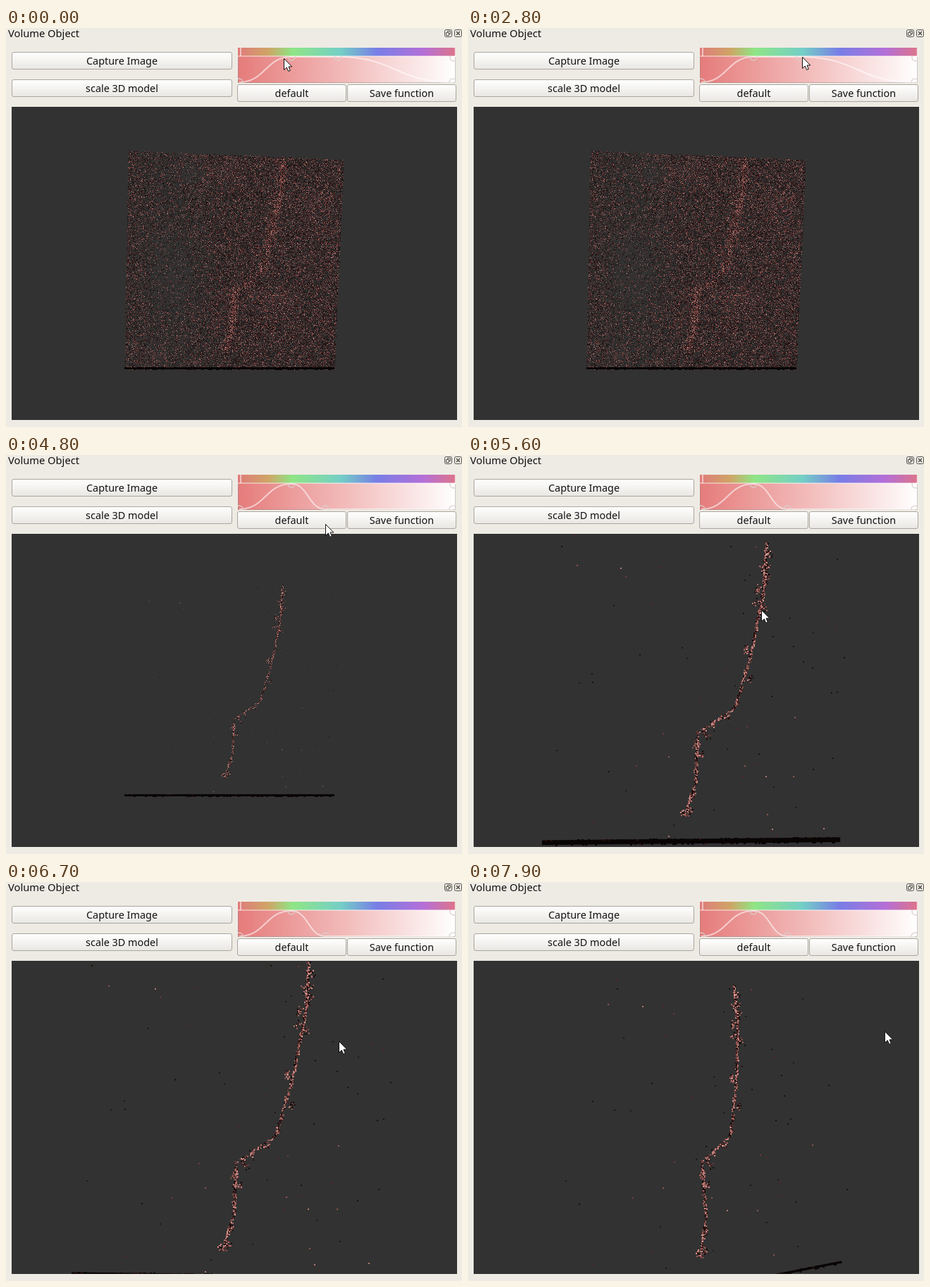
Write an HTML page with a canvas that moves like this. It is 647x567 px and loops after 8 s.

```html
<!DOCTYPE html>
<html lang="en">
<head>
<meta charset="utf-8">
<title>Volume Object</title>
<style>
  html, body { margin: 0; width: 100%; height: 100%; overflow: hidden; background: #eeebe4; }
  canvas { position: absolute; left: 8px; top: 112px; background: #323232; }
  svg { position: absolute; left: 0; top: 0; }
  text { font: 14.4px "Noto Sans", "Open Sans", sans-serif; fill: #111; }
  .title { font-size: 14.7px; }
  .btn rect { fill: url(#face); stroke: #aaa69f; }
  .btn text { text-anchor: middle; }
  .dock { fill: none; stroke: #55524d; }
  #knots { fill: none; stroke: #d9d0d0; stroke-opacity: .85; stroke-width: 1.5; }
</style>
</head>
<body>
<canvas id="view" width="632" height="445"></canvas>
<svg width="647" height="567">
  <defs>
    <linearGradient id="face" x2="0" y2="1">
      <stop stop-color="#fff"/><stop offset="1" stop-color="#e9e7e2"/>
    </linearGradient>
    <linearGradient id="hue">
      <stop stop-color="#e07b7b"/><stop offset=".14" stop-color="#cfa566"/>
      <stop offset=".25" stop-color="#8fe585"/><stop offset=".47" stop-color="#74cfc6"/>
      <stop offset=".64" stop-color="#787ee6"/><stop offset=".85" stop-color="#b46fd8"/>
      <stop offset="1" stop-color="#dd7489"/>
    </linearGradient>
    <linearGradient id="fade">
      <stop stop-color="#e57c7b"/><stop offset=".5" stop-color="#f2bcbb"/><stop offset="1" stop-color="#fff"/>
    </linearGradient>
    <clipPath id="box"><path d="M329 40H638V78H329z"/></clipPath>
  </defs>
  <text class="title" x="3" y="13">Volume Object</text>
  <g class="dock">
    <rect x="622.5" y="2.5" width="10" height="10" rx="2"/>
    <path d="M626.5 6.5V4.5h4v4h-2M624.5 6.5h4v4h-4z"/>
    <rect x="636.5" y="2.5" width="10" height="10" rx="2"/>
    <path d="M639 5l5 5m0-5l-5 5" stroke-width="1.6"/>
  </g>
  <g id="buttons"></g>
  <rect x="329" y="28" width="309" height="12" fill="url(#hue)"/>
  <path d="M333 28v12M637.5 28v12" stroke="#fff" stroke-opacity=".7" stroke-width="1.5"/>
  <rect x="329" y="40" width="309" height="38" fill="url(#fade)"/>
  <path d="M329 40H638" stroke="#fff" stroke-opacity=".8"/>
  <path d="M329.5 41V77.5H637.5V41" fill="none" stroke="#8d8583" stroke-opacity=".45"/>
  <g clip-path="url(#box)">
    <path id="curve" fill="none" stroke="#fff" stroke-opacity=".58" stroke-width="2"/>
    <g id="knots">
      <circle cx="331" cy="77" r="5"/><circle cx="405" cy="41" r="5"/><circle id="knot" r="5"/>
      <circle cx="635" cy="42" r="5"/><circle cx="634" cy="77" r="5"/>
    </g>
  </g>
  <path id="cursor" d="M.5 .5V16.5L4.3 13L6.7 18.5L9.3 17.4L7 12H11.8z" fill="#fff" stroke="#111"/>
</svg>
<script>
const $ = id => document.getElementById(id);
const ctx = $('view').getContext('2d');
ctx.translate(-8, -112);

$('buttons').innerHTML = [
  ['Capture Image', 8, 34, 313], ['scale 3D model', 8, 73, 313],
  ['default', 328, 80, 155], ['Save function', 484, 80, 155]
].map(([label, x, y, w]) => `<g class="btn">
  <rect x="${x + .5}" y="${y + .5}" width="${w - 1}" height="24" rx="2.5"/>
  <text x="${x + w / 2}" y="${y + 18}">${label}</text></g>`).join('');

const ramp = (t, from, to) => Math.min(1, Math.max(0, (t - from) / (to - from)));
const mix = (a, b, f) => a + (b - a) * f;

let seed = 4711;
const rnd = () => (seed = seed * 16807 % 2147483647) / 2147483647;
const spread = r => (rnd() + rnd() + rnd() - 1.5) * r;
const pick = list => list[Math.floor(rnd() * list.length)];

const stemInk = ['#bd7771', '#a3625b', '#85504a', '#67393a', '#cf918a', '#261212', '#140a0a', '#3c1f1e'];
const reds = ['#54292a', '#6f3a37', '#91554f', '#b47870'];
const darks = ['#180f0f', '#241717', '#1e1313'];

// The dendrite leans away from the viewer towards its top
const stem = [[392, 184], [389, 232], [376, 298], [360, 350], [323, 375], [321, 425], [310, 458]];
const depthAt = y => (y - 360) * .2;
function onStem() {
  const y = mix(184, 458, rnd());
  const i = stem.findIndex(p => p[1] >= y), a = stem[i - 1], b = stem[i];
  return [mix(a[0], b[0], (y - a[1]) / (b[1] - a[1])), y];
}

const dots = [];
const add = (x, y, z, ink, rank = 0) => dots.push({ x, y, z, ink, rank });

for (let i = 0; i < 750; i++) {
  const [x, y] = onStem();
  add(x + spread(1.5), y + spread(1.5), depthAt(y), pick(stemInk));
}
for (let spine = 0; spine < 26; spine++) {
  const [x, y] = onStem(), dx = spread(8);
  for (let i = 0; i < 12; i++) add(x + dx + spread(3.5), y + spread(3.5), depthAt(y), pick(stemInk));
}

// Noise filling the block: thinner at the left, redder in a few patches
const patches = [[217, 466, 13], [380, 385, 20], [315, 205, 14], [440, 250, 20]];
const blob = (x, y, [cx, cy, r]) => Math.exp(-((x - cx) ** 2 + (y - cy) ** 2) / (r * r));
for (let i = 0; i < 78000; i++) {
  const u = rnd(), v = rnd();
  const x = 173 + 306 * u - v * (5 + 8 * u), y = 174 + 13 * u + v * (311 - 13 * u);
  const ring = Math.hypot(x - 265, y - 206);
  const fill = .5 + .4 * ramp(x, 250, 320) + .2 * ramp(x, 215, 185)
    - .3 * blob(x, y, [235, 350, 50]) - (ring < 15 ? .35 : 0);
  if (rnd() > fill) continue;
  const glow = patches.reduce((sum, p) => sum + .6 * blob(x, y, p), ring > 17 && ring < 29 ? .35 : 0);
  const ink = rnd() < .44 + .4 * glow ? reds[Math.floor(rnd() ** 1.7 * 4)] : pick(darks);
  add(x, y, spread(70), ink, rnd());
}
for (let i = 0; i < 1000; i++) {
  const [x, y] = onStem();
  add(x + spread(8), y + spread(6), depthAt(y), pick(reds), mix(.01, 1, rnd()));
}
const bumps = Array.from({ length: 110 }, () => [rnd(), rnd(), rnd()]);

function drawVolume(t) {
  const zoom = ramp(t, 5300, 5600), drag = ramp(t, 5700, 6700), turn = ramp(t, 6700, 7900);
  const k = 1 + .42 * zoom + .08 * drag - .04 * turn, persp = .0008 * turn;
  const cx = 330 + 5 * zoom + drag + turn, cy = 350 + 9 * zoom + 2 * drag - turn;
  const yaw = .61 * turn, cos = Math.cos(yaw), sin = Math.sin(yaw);
  const size = k > 1.2 ? 2 : 1;
  const project = (x, y, z) => {
    const q = k / (1 - persp * (y - 350));
    return [cx + q * ((x - 330) * cos + z * sin), cy + q * (y - 350)];
  };
  const shown = Math.exp(-6.6 * ramp(t, 2800, 4100));

  ctx.fillStyle = '#323232';
  ctx.fillRect(8, 112, 632, 445);
  for (const d of dots) {
    if (d.rank > shown) continue;
    const [x, y] = project(d.x, d.y, d.z);
    ctx.fillStyle = d.ink;
    ctx.fillRect(Math.round(x), Math.round(y), size, size);
  }

  // Floor slab seen edge-on, with ragged edges
  const roll = -.01 * zoom + .022 * drag - .21 * turn;
  const thick = 4 + 9 * (k - 1) * (1 - 1.5 * yaw);
  const floorAt = f => {
    const [x, y] = project(mix(168, 466, f), 483.5, 12 * f);
    return [x, y + roll * (x - cx)];
  };
  ctx.strokeStyle = '#090505';
  ctx.lineWidth = thick - 1;
  ctx.beginPath();
  ctx.moveTo(...floorAt(0));
  ctx.lineTo(...floorAt(1));
  ctx.stroke();
  for (const [f, side, tone] of bumps) {
    const [x, y] = floorAt(f * .99);
    ctx.fillStyle = tone < .12 ? '#2a1110' : '#090505';
    ctx.fillRect(Math.round(x), Math.round(y + (side < .6 ? -thick / 2 : thick / 2 - 1)), 3, size);
  }
}

// Pointer glides: start, end, x, y
const glides = [
  [600, 1200, 497, 38], [1200, 1400, 574, 52], [1400, 1500, 560, 58], [1500, 2200, 465, 35],
  [2200, 2400, 474, 41], [2800, 3600, 473, 66], [3600, 4100, 471, 80], [4200, 4800, 453, 98],
  [4900, 5200, 334, 348], [5300, 5600, 416, 220], [5700, 6700, 472, 226], [6700, 7900, 591, 212]];

function draw(t) {
  let x = 394, y = 43;
  for (const [from, to, gx, gy] of glides) {
    const f = ramp(t, from, to);
    x = mix(x, gx, f);
    y = mix(y, gy, f);
  }
  $('cursor').setAttribute('transform', `translate(${Math.round(x)} ${Math.round(y)})`);

  const kx = mix(471, 453, ramp(t, 4200, 4800)), ky = mix(41, 77, ramp(t, 2800, 4100));
  const a = (405 + kx) / 2, b = (kx + 634) / 2;
  $('curve').setAttribute('d',
    `M331 77C368 77 368 41 405 41C${a} 41 ${a} ${ky} ${kx} ${ky}C${b} ${ky} ${b} 77 634 77`);
  $('knot').setAttribute('cx', kx);
  $('knot').setAttribute('cy', ky);
  drawVolume(t);
}

// The picture advances ten times a second
let last = 0;
function tick(now) {
  const t = Math.floor(now % 8000 / 100) * 100;
  if (t !== last) draw(last = t);
  requestAnimationFrame(tick);
}
draw(0);
requestAnimationFrame(tick);
</script>
</body>
</html>
```
